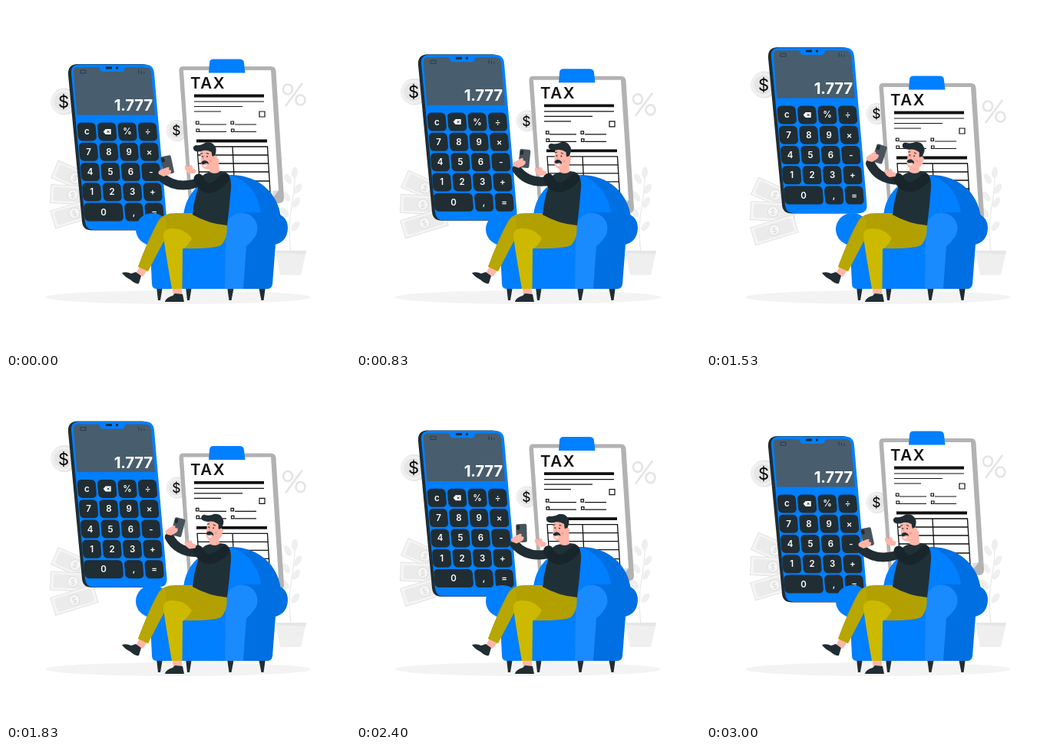
Animation, 448 px wide and 450 px high, one loop 3.03 s. Source, as an HTML page:

```html
<!DOCTYPE html>
<html lang="en">
<head>
<meta charset="utf-8">
<title>Tax calculator</title>
<style>
html, body { margin: 0; width: 100%; height: 100%; overflow: hidden; background: #fff; }
svg { display: block; width: 448px; height: 450px; }
text { font-family: Inter, "Open Sans", sans-serif; text-anchor: middle; }
.dark { fill: #202d33; }
.blue { fill: #007fff; }
.deep { fill: #006fe2; }
.light { fill: #1a8aff; }
.skin { fill: #ffb5a7; }
.sleeve { fill: none; stroke: #202d33; stroke-linecap: round; stroke-linejoin: round; }
.keys text { fill: #fff; font-size: 11.5px; font-weight: 600; }
.coin text { fill: #f8f8f8; font-weight: 600; }
</style>
</head>
<body>
<svg viewBox="0 0 448 450">
  <defs>
    <g id="bill">
      <rect x="-29" y="-12" width="58" height="24" fill="#f5f5f5" stroke="#e2e2e2"/>
      <rect x="-25" y="-9" width="50" height="18" rx="3" fill="#ebebeb"/>
      <circle r="7" fill="#f6f6f6" stroke="#dedede"/>
      <text y="4" font-size="10" fill="#d6d6d6">$</text>
    </g>
    <g id="coin">
      <circle cx="1" r="17.500" fill="#e4e4e4"/>
      <circle cx="-1" r="16" fill="#f0f0f0"/>
      <circle r="12.500" fill="#e6e6e6"/>
      <text y="8" font-size="22">$</text>
    </g>
  </defs>

  <ellipse cx="224" cy="381" rx="173" ry="9" fill="#f3f3f3"/>

  <g id="plant" fill="#efefef">
    <path d="M371 322Q367 290 372 262T376 213" fill="none" stroke="#e8e8e8" stroke-width="1.200"/>
    <path d="M351 320H391L384 352H357Z"/>
    <path d="M352 320H391L390 325L353 323Z" fill="#e6e6e6"/>
  </g>

  <g class="rise coin">
    <use href="#coin" transform="translate(75 125)"/>
    <use href="#coin" transform="translate(222 163) scale(.8)"/>
  </g>

  <g class="fall">
    <use href="#bill" transform="translate(90 225) rotate(24)"/>
    <use href="#bill" transform="translate(87 247) rotate(3)"/>
    <use href="#bill" transform="translate(89 271) rotate(-17)"/>
    <g fill="none" stroke="#e4e4e4" stroke-width="2.600">
      <path d="M386 101L364 131"/>
      <ellipse cx="367" cy="109" rx="6" ry="6.500"/>
      <ellipse cx="383.500" cy="123" rx="6" ry="6.500"/>
    </g>
  </g>

  <g class="rise">
    <path class="dark" d="M92 76H177Q189 76 190 88L206 281Q207 293.500 196 293.500H112Q100 293.500 99 282L81 90Q80 77 92 76Z"/>
    <path class="blue" d="M95 76.500H181Q192 76.500 193 88L209.500 282Q210 293 199 293H114Q104 293 103 282L85 88Q84 77 95 76.500Z"/>
    <path d="M93 80H182Q188 80 189 87L194 142.500H92.500L88 87Q87 80 93 80Z" fill="#485d6d"/>
    <path class="blue" d="M119 79.500H158Q155 80 154.500 83Q154 86 150 86H128Q123 86 122.500 83Q122 80 119 79.500Z"/>
    <path class="dark" d="M130 79.500H138V82.500H130ZM143 79.500h3v3h-3Z"/>
    <path d="M97 84h7v4h-7ZM173 83v5.500M176.500 85v3.500M180 86v2.500" fill="none" stroke="#2b3b45"/>
    <text x="191" y="137" style="text-anchor:end" font-size="20.500" font-weight="700" letter-spacing="-.3" fill="#fff">1.777</text>
    <g id="keys" class="keys"></g>
  </g>

  <g class="fall">
    <path d="M230 79H345Q351 79 351.500 85L362 251Q362 258 355 258H245Q238 258 237.500 250L225.500 86Q225 79 230 79Z" fill="#b2b2b2"/>
    <path d="M231 84H345L355 241L348 250H242Z" fill="#fff"/>
    <path d="M355 241L348 250L347 242Z" fill="#ddd"/>
    <path class="blue" d="M264 87.500L265 75Q265 69.500 270 69.500H304Q310 69.500 310 75L311.500 87.500Z"/>
    <text x="240" y="108" style="text-anchor:start" font-size="20.500" font-weight="600" letter-spacing="1.600" fill="#111">TAX</text>
    <g fill="none" stroke="#111">
      <path d="M245 117.500H336M248 176.500H340" stroke-width="3.800"/>
      <path d="M245 125H336M245 131.500H308M245 138H280M252 155H287M252 164.500H287M298 155H326M298 164.500H326" stroke-width="1.200"/>
      <path d="M330 138h7v7h-7ZM247.500 151h3.500v3.500h-3.500ZM248 161h3.500v3.500h-3.500ZM293 151h3.500v3.500h-3.500ZM293.500 161h3.500v3.500h-3.500Z" stroke-width="1.200"/>
      <path d="M249 184H340.500L344 243H253ZM250 195H341M250 206H342M251 217H342M252 229H343M295 184L298 243" stroke-width="1.300"/>
    </g>
  </g>

  <g>
    <path class="dark" d="M196 367H204L201 385H198ZM234 367H242L239 385H236ZM288 367H297L293.500 385H290.500ZM329 367H338L335.500 385H332.500Z"/>
    <path class="deep" d="M231 277C233 240 262 221 295 221C328 222 354 243 358 277L348 310H231Z"/>
    <path class="blue" d="M231 277C233 240 262 221 291 221C316 228 331 248 333 278L320 310H231Z"/>
    <path class="deep" d="M306 270H346Q367 272 367 291Q366 308 351 312L347 364Q346 370 340 370H300Z"/>
    <path class="blue" d="M187 300H312L308 370H196Q190 370 190 363Z"/>
    <path class="light" d="M286 295H325Q322 309 313 314L309 370H285Z"/>
    <circle class="light" cx="307" cy="291" r="20.500"/>
    <rect class="blue" x="169" y="271" width="43" height="42" rx="21"/>
    <path class="blue" d="M204 285H286V315H207Z"/>
  </g>

  <g>
    <path class="skin" d="M174 341L184 346L178 354L169 350ZM216 366H229V378H218Z"/>
    <path class="dark" d="M151 349Q157 347 163 350L169 348L176 353L173 363Q168 364 162 358Q154 354 151 349ZM207 386.500Q209 381 217 379L220 376L230 377L232 387H207Z"/>
    <path d="M244 271L287 284Q290 303 280 313Q270 318 230 317L208 300L185 347L172 341Q185 305 199 280Q205 271 220 271Z" fill="#b1a000"/>
    <path d="M208 276Q199 278 194 291L172 341L185 347L210 299Z" fill="#b8a700"/>
    <path d="M205 302Q204 292 214 291Q232 290 242 304Q237 314 230 318L229.500 370H216Q209 330 205 302Z" fill="#ccb900"/>
  </g>

  <path id="farArm" class="sleeve" stroke-width="12"/>
  <path d="M260 219Q272 214 285 217Q294 221 293 238Q291 263 288 287Q264 285 243 273Q245 253 250 239Q250 224 260 219Z" fill="#203037"/>
  <path class="skin" d="M265 200H277L278 217Q272 221 265 217Z"/>
  <g id="head">
    <path class="skin" d="M253 188Q261 184 271 188L275 204Q272 213 264 214Q255 214 254 206Z"/>
    <path class="dark" d="M245 189Q242 184 247 182Q254 183 260 178.500Q268 177 271 182Q275 185 273 193L271 200L268.500 196L267.500 191Q262 188 257 189Q250 192 245 189Z"/>
    <circle class="skin" cx="272" cy="199" r="3.200"/>
    <path class="dark" d="M254 206Q255 202 259 202Q264 203 264 207Q261 205 259 206.500Q256 208 254 206Z"/>
    <path d="M256 209Q259 207 262 209Q260 211 256 209Z" fill="#fff"/>
    <path d="M253 193.500l3 -1M261 192.500l3 1" stroke="#202d33"/>
    <path d="M256 196v1.800M262 196v1.800" stroke="#202d33" stroke-width="1.400"/>
    <path d="M258 196Q256 200 258 201" fill="none" stroke="#f28f8f"/>
    <circle cx="266.500" cy="203" r="1.800" fill="#ff9b97"/>
  </g>

  <g id="device">
    <rect x="-7" y="-12" width="14" height="24" rx="2" fill="#48545c"/>
    <rect x="-6" y="-10.500" width="4" height="6" rx="1.500" class="dark"/>
  </g>
  <path id="hand" class="skin" d="M-6 3Q-8 -1 -3 -3L5 -6Q9 -7 7 -3L10 -2Q11 2 6 4L0 6Z"/>
  <path id="nearArm" class="sleeve" stroke-width="13" style="stroke:#18252b"/>
  <path id="free" class="skin" d="M7 5L-1 5Q-7 0 -6 -5Q-3 -7 -1 -3L1 -6Q4 -6 4 -2L9 1Z"/>
</svg>

<script>
const $ = id => document.getElementById(id);
const mix = (a, b, p) => a + (b - a) * p;
const PERIOD = 3030, CYCLE = 3000, LIFT = 22;

// Calculator keys: each row slides right to follow the slanted body.
const rows = ["c<%÷", "789×", "456-", "123+", "0 ,="];
let keys = "";
rows.forEach((row, r) => [...row].forEach((label, c) => {
  if (label === " ") return;
  const wide = label === "0";
  const x = 105.3 + 26.4 * c + 2.15 * r + (wide ? 13.2 : 0);
  const y = 164.4 + 26.3 * r, w = wide ? 50.5 : 24;
  keys += `<g transform="translate(${x} ${y})">
    <rect class="dark" x="${-w / 2}" y="-12" width="${w}" height="24" rx="5.5" transform="skewX(4.6)"/>` +
    (label === "<"
      ? `<path d="M-5 0L-2 -3.5H5V3.5H-2Z" fill="#fff"/><path d="M0 -1.5l3 3m0 -3l-3 3" stroke="#202d33"/>`
      : `<text y="4">${label}</text>`) + "</g>";
}));
$("keys").innerHTML = keys;

// Plant leaves: x, y, angle
const leaves = [[376, 218, 5], [367, 226, -30], [380, 239, 35], [365, 249, -35],
  [378, 257, 30], [363, 270, -40], [377, 288, 40]];
$("plant").innerHTML += leaves.map(([x, y, a]) =>
  `<ellipse cx="${x}" cy="${y}" rx="4" ry="7.5" transform="rotate(${a} ${x} ${y})"/>`).join("");

function place(id, from, to, p) {
  const [x, y, a] = from.map((v, i) => mix(v, to[i], p));
  $(id).setAttribute("transform", `translate(${x} ${y}) rotate(${a})`);
}

function bend(id, from, to, p) {
  const v = from.map((n, i) => mix(n, to[i], p));
  $(id).setAttribute("d", `M${v[0]} ${v[1]}Q${v[2]} ${v[3]} ${v[4]} ${v[5]}`);
}

const shift = (name, y) => document.querySelectorAll("." + name)
  .forEach(el => el.setAttribute("transform", `translate(0 ${y})`));

function draw(now) {
  const t = Math.min(now % PERIOD, CYCLE);
  const p = (1 - Math.cos(2 * Math.PI * t / CYCLE)) / 2;
  shift("rise", -LIFT * p);
  shift("fall", LIFT * p);
  $("head").setAttribute("transform", `translate(${5 * p} ${p}) rotate(${12 * p} 272 216)`);
  place("device", [210, 208, -12], [226, 193.5, 18], p);
  place("hand", [205, 217, 0], [215, 198, -12], p);
  place("free", [239, 214, 0], [239, 219, -8], p);
  bend("farArm", [203, 224, 226, 244, 262, 226], [214, 206, 226, 232, 264, 227], p);
  bend("nearArm", [251, 226, 262, 251, 285, 225], [250, 225, 262, 248, 285, 226], p);
  requestAnimationFrame(draw);
}
requestAnimationFrame(draw);
</script>
</body>
</html>
```
